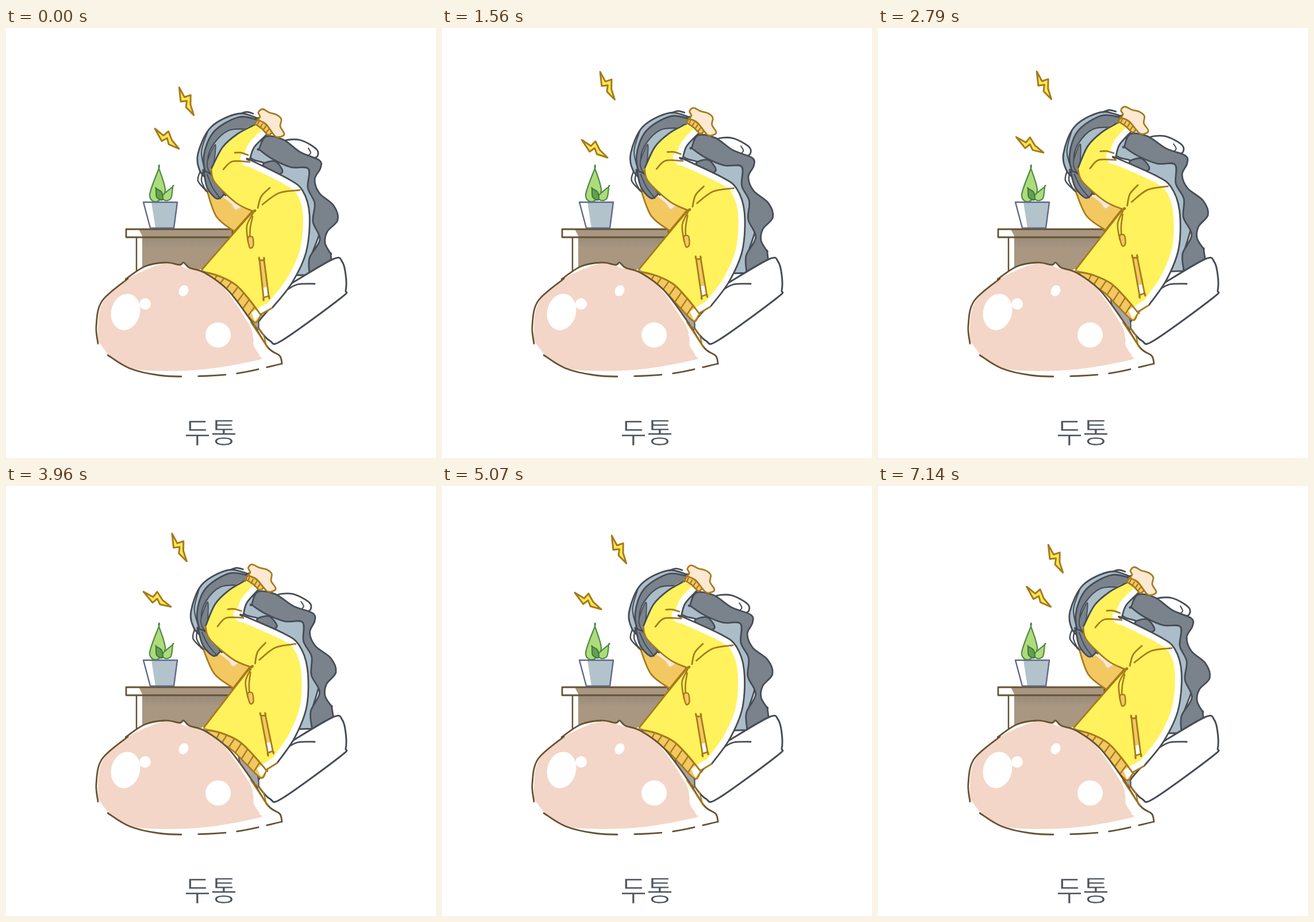
An HTML page with a canvas for the animation above (7.2 s loop, 748 by 748 pixels).

```html
<!DOCTYPE html>
<html lang="ko">
<head>
<meta charset="utf-8">
<style>
html, body { margin: 0; width: 100%; height: 100%; overflow: hidden; background: #fff; }
canvas { display: block; width: 748px; height: 748px; }
</style>
</head>
<body>
<canvas id="stage" width="748" height="748"></canvas>
<script>
const ctx = document.getElementById('stage').getContext('2d');
const LOOP = 7200, STEP = 30, LAST = LOOP - 2 * STEP;

const SLATE = '#454c55', DARK = '#7a828b', LIGHT = '#abbdc8';
const BROWN = '#a67a1d', YELLOW = '#fff25c', ORANGE = '#f3c860', SKIN = '#fde9d1';
const UMBER = '#655232', PINK = '#f3d6c7', WOOD = '#a99781', LEAF = '#aedb7b';

// Smooth curve through "x y, x y, ..."; a point marked ! is a corner.
function curve(text, closed) {
  const p = text.split(',').flatMap(s => {
    const [x, y] = s.trim().split(/[ !]+/).map(Number);
    return s.includes('!') ? [[x, y], [x, y]] : [[x, y]];
  });
  const n = p.length;
  const at = i => closed ? p[(i + n) % n] : p[Math.max(0, Math.min(n - 1, i))];
  const path = new Path2D();
  path.moveTo(...p[0]);
  for (let i = 0; i < (closed ? n : n - 1); i++) {
    const a = at(i - 1), b = at(i), c = at(i + 1), d = at(i + 2);
    path.bezierCurveTo(
      b[0] + (c[0] - a[0]) / 6, b[1] + (c[1] - a[1]) / 6,
      c[0] - (d[0] - b[0]) / 6, c[1] - (d[1] - b[1]) / 6, c[0], c[1]);
  }
  return path;
}

function shape(text, fill, stroke, width = 2.8) {
  const path = curve(text, true);
  if (fill) { ctx.fillStyle = fill; ctx.fill(path); }
  if (stroke) { ctx.strokeStyle = stroke; ctx.lineWidth = width; ctx.stroke(path); }
}

function line(text, color, width = 2.8) {
  ctx.strokeStyle = color;
  ctx.lineWidth = width;
  ctx.stroke(curve(text, false));
}

function poly(points, fill, stroke, width = 2.6) {
  const path = new Path2D('M' + points + 'Z');
  if (fill) { ctx.fillStyle = fill; ctx.fill(path); }
  if (stroke) { ctx.strokeStyle = stroke; ctx.lineWidth = width; ctx.stroke(path); }
}

function spot(x, y, rx, ry = rx, turn = 0) {
  ctx.fillStyle = '#fff';
  ctx.beginPath();
  ctx.ellipse(x, y, rx, ry, turn, 0, Math.PI * 2);
  ctx.fill();
}

function isolated(paint) {
  ctx.save();
  paint();
  ctx.restore();
}

// Eased walk between stops [time, x, y].
function walk(stops, t) {
  const i = Math.max(1, stops.findIndex(s => s[0] >= t));
  const [t0, x0, y0] = stops[i - 1], [t1, x1, y1] = stops[i];
  const e = (1 - Math.cos(Math.PI * (t - t0) / (t1 - t0))) / 2;
  return [x0 + (x1 - x0) * e, y0 + (y1 - y0) * e];
}

const topWalk = [[0, 314, 127.5], [1950, 285, 97.5], [5070, 308, 110.5], [LAST, 309, 126.5]];
const lowWalk = [[0, 280, 192.5], [1560, 265.5, 210], [3960, 263, 197], [5070, 254, 200], [LAST, 279.5, 192.5]];

function drawDesk() {
  const shade = ctx.createLinearGradient(0, 364, 0, 384);
  shade.addColorStop(0, '#998c7b');
  shade.addColorStop(1, WOOD);
  ctx.fillStyle = shade;
  ctx.fillRect(237, 364, 160, 70);
  line('227 365, 227 424', UMBER, 2.5);
  const top = '209 350 394 350 394 364 209 364';
  poly(top, '#fff');
  poly('231 350 394 350 394 364 238 364', WOOD);
  poly(top, null, UMBER, 2.8);
}

function drawPlant() {
  shape('266 244!, 250 290, 262 302, 277 283', LEAF, '#4d8b43', 2.2);
  shape('290 276!, 272 292, 277 300, 287 296', LEAF, '#4d8b43', 2.2);
  shape('261 279!, 271 286, 272 299, 262 294', '#63a052', '#3f7838', 2);
  const pot = '239 303 298 303 292 348 251 348';
  poly(pot, '#fff');
  poly('253 303 298 303 292 348 260 348', '#b3c3cc');
  poly(pot, null, '#5e678c', 2.4);
}

function drawTail() {
  shape('425 190!, 500 215, 528 245, 526 278, 539 305, 536 328, 547 350, 530 400, 528 430!, 470 430!, 470 260, 425 225', LIGHT, SLATE);
  shape('484 197, 512 195, 541 212, 536 226, 500 212', '#fff', SLATE);
  line('526 209, 530 217, 526 222', SLATE, 2);
  shape('440 211!, 452 189, 482 194, 512 216, 545 230, 547 244, 537 263, 545 287, 570 309, 577 334, 559 354, 555 374, 565 393!, 567 420!, 528 430!, 528 400, 546 368, 534 337, 537 305, 525 278, 526 245, 495 242, 462 227', DARK, SLATE);
}

function drawPillow() {
  shape('497 444!, 569 402, 585 407, 591 430, 591 456, 582 470, 481 543, 459 544, 438 520, 440 510, 464 482', '#fff', SLATE, 3);
  line('485 458, 507 446, 537 445', SLATE);
}

function drawHead() {
  shape('438 157!, 404 149, 357 172, 334 218, 337 248, 352 265!, 400 180', LIGHT, SLATE);
  shape('438 160!, 405 155, 362 180, 344 223, 352 258, 380 240, 430 172', DARK, SLATE);
  shape('424 176!, 388 178, 361 202, 351 230, 360 250, 400 210', LIGHT, SLATE, 2.2);
  shape('364 203, 350 234, 356 252, 362 232', DARK, SLATE, 1.8);
  line('408 149, 419 146, 430 149', SLATE);
  line('351 180, 340 215, 346 248', SLATE, 2);
}

function drawFace() {
  shape('350 284!, 390 294, 429 318!, 397 354!, 366 328', ORANGE, BROWN);
  shape('370 288!, 395 289, 429 318!, 413 310, 400 317, 392 306', SKIN);
  line('391 306, 399 317, 412 311, 426 313', '#efc98a', 2.4);
  shape('344 249!, 358 256, 380 289!, 367 297, 350 278', DARK, SLATE);
  line('350 255, 359 277, 373 297', SLATE, 2);
  line('338 249, 334 266, 350 285', SLATE, 2.4);
  line('343 249, 340 265, 346 280', SLATE, 2.4);
}

const armEdge = '429 170, 403 184, 377 207, 357 245';
const chestEdge = '357 245, 363 268, 400 304, 430 319!, 397 356, 341 420';
const backEdge = '455 184, 432 207, 424 229!, 490 262, 516 283, 528 325, 522 390, 497 444, 463 487';
const hemTop = [[346, 425], [372, 432], [400, 447], [422, 471], [443, 499]];
const hemBottom = [[350, 432], [363, 444], [388, 463], [410, 488], [433, 512]];
const join = points => points.map(p => p.join(' ')).join(', ');

function drawJacket() {
  shape('447 238, 468 232, 481 249, 470 254', DARK, SLATE);
  const body = `${armEdge}, ${chestEdge}!, 380 444, 438 501!, 463 487!, ${backEdge.split(', ').reverse().join(', ')}!`;
  shape(body, YELLOW);
  isolated(() => {
    ctx.clip(curve(body, true));
    line(backEdge, '#fff', 23);
    line('463 487, 438 501', '#fff', 23);
  });
  line(armEdge, SLATE);
  line(chestEdge, BROWN);
  line(backEdge, SLATE);
  line('463 487, 438 501', BROWN);

  line('378 246, 394 232, 424 233', BROWN);
  line('398 217, 409 217, 421 221', BROWN);
  line('438 313, 444 293, 459 278', BROWN);
  line('446 307, 475 287, 511 282', BROWN);

  line('430 322, 419 344, 421 372', BROWN, 2.6);
  line('429 328, 425 347, 424 366', BROWN, 2.6);
  shape('421 365, 429 364, 430 379, 424 382', ORANGE, BROWN, 2.4);

  poly('441 404 449 404 457 466 448 469', ORANGE);
  poly('446 452 455 450 457 466 448 469', '#fff');
  shape('441 404!, 449 404!, 457 466!, 448 469!', null, BROWN);
}

function drawHem() {
  const band = `${join(hemTop)}!, ${join([...hemBottom].reverse())}!`;
  shape(band, ORANGE, BROWN);
  poly('427 495 436 489 442 500 433 510', '#fff');
  // Ribs run across the band at even steps.
  const between = (edge, s) => {
    const i = Math.floor(s), f = s - i;
    return edge[i].map((v, a) => v + (edge[i + 1][a] - v) * f);
  };
  for (let s = .8; s < 3.9; s += .45)
    line(join([between(hemTop, s), between(hemBottom, s)]), BROWN, 2.4);
  line(join(hemTop), BROWN);
}

function drawHand() {
  shape('433 167!, 441 160, 462 178, 456 186, 445 175', ORANGE, BROWN);
  for (let i = 0; i < 4; i++)
    line(`${440 + 6 * i} ${163 + 4 * i}, ${437 + 5 * i} ${169 + 4.5 * i}`, BROWN, 2.2);
  shape('438 160!, 442 154, 439 147, 446 141, 458 147, 471 151, 479 159, 477 171, 484 184, 478 189, 468 188, 452 167', SKIN, BROWN);
}

const ridge = '208 437, 241 415, 277 408, 302 412, 309 408, 319 417, 346 426, 386 456, 426 509, 456 556, 476 570, 480 584';
const base = '177 569, 215 592, 266 604, 320 606, 400 601, 480 584';

function drawBlanket() {
  shape(`${ridge}, ${base.split(', ').reverse().join(', ')}, 160 549, 157 520, 167 475`, '#fff');
  shape('345 425, 314 418, 278 409, 211 437, 168 478, 160 525, 165 551, 213 591, 330 595, 436 578, 441 570, 431 553, 430 538, 422 514, 380 453', PINK);
  line('160 549, 157 518, 167 475, 212 436', UMBER);
  line(ridge, UMBER);
  line('426 512, 440 533, 455 556', BROWN, 2.2);
  line('433 518, 447 532, 453 554', BROWN, 2.2);
  isolated(() => {
    ctx.setLineDash([136, 30, 47, 20, 38, 15, 40, 99]);
    line(base, UMBER);
  });
  spot(208, 494, 25, 32, .25);
  spot(242, 480, 10);
  spot(309, 457, 8, 10, .5);
  spot(369, 534, 22);
}

function drawBolt([x, y], turn) {
  isolated(() => {
    ctx.translate(x, y);
    ctx.rotate(turn);
    poly('-24 -13 -7 -4 0 -13 9 1 24 13 5 9 0 -1 -8 6', '#ffe94f', BROWN, 3);
  });
}

function drawLabel() {
  ctx.font = '300 50px "Noto Sans CJK KR", "Noto Sans CJK", "Noto Sans CJK JP", sans-serif';
  ctx.textAlign = 'center';
  ctx.fillStyle = '#4c545e';
  ctx.fillText('두통', 356, 721.5);
  // A white rim makes the strokes lighter.
  ctx.strokeStyle = '#fff';
  ctx.lineWidth = .9;
  ctx.strokeText('두통', 356, 721.5);
}

function leaning(k, ...parts) {
  isolated(() => {
    ctx.transform(1, -.042 * k, .08 * k, 1, -29.9 * k, 14 * k);
    parts.forEach(part => part());
  });
}

function draw(t) {
  const k = Math.abs(Math.sin(Math.PI * t / LAST)) ** 1.7;
  ctx.fillStyle = '#fff';
  ctx.fillRect(0, 0, 748, 748);
  ctx.lineJoin = ctx.lineCap = 'round';
  drawDesk();
  drawPlant();
  leaning(k, drawTail);
  drawPillow();
  shape('405 470, 430 485, 439 510, 437 525, 420 512', '#a6a5a8', SLATE, 2);
  leaning(k, drawHead, drawFace, drawJacket, drawHem, drawHand);
  drawBlanket();
  drawBolt(walk(topWalk, t), .59);
  drawBolt(walk(lowWalk, t), .2 * (1 - k));
  drawLabel();
}

const start = performance.now();
function tick() {
  const t = (performance.now() - start) % LOOP;
  draw(Math.min(Math.floor(t / STEP) * STEP, LAST));
  requestAnimationFrame(tick);
}
tick();
</script>
</body>
</html>
```
